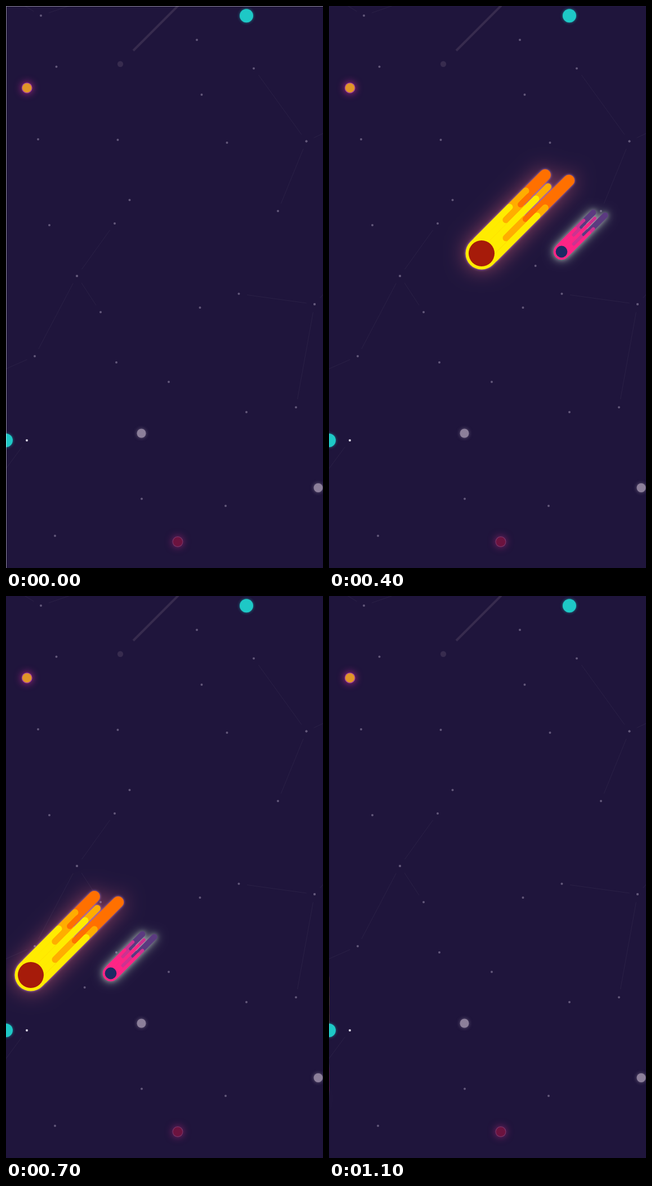
Recreate the animation shown at these times as an HTML page with a canvas. Size 563x995 px, loop 1.2 s.

```html
<!DOCTYPE html>
<html lang="en">
<head>
<meta charset="utf-8">
<title>Comets</title>
<style>
html, body { margin: 0; width: 100%; height: 100%; overflow: hidden; background: #1f153c; }
canvas { display: block; width: 563px; height: 995px; }
</style>
</head>
<body>
<canvas id="stage" width="563" height="995"></canvas>
<script>
const W = 563, H = 995, STEP = 100, COUNT = 12, TAU = Math.PI * 2;
const STAR = '#63587a', DUST = '#372b4e';

// chains of linked stars; some ends lie outside the stage
const CONSTELLATIONS = [
  [[12, -13], [62, 17], [140, -10]],
  [[440, 110.5], [533.5, 239.5], [483, 363]],
  [[533.5, 239.5], [590, 213]],
  [[193, 385], [126, 478], [51, 620], [-40, 660]],
  [[126, 478], [168, 542]],
  [[413.5, 509.5], [548, 528], [515, 710.5]],
  [[548, 528], [585, 486]],
  [[37, 769], [-20, 846]]
];
const LOOSE = [
  [339, 60], [89.5, 107.5], [347.5, 157], [57, 236], [198.5, 237],
  [392.5, 242], [219.5, 343.5], [77, 388], [344.5, 534], [196, 631],
  [289, 665.5], [427, 719], [241, 872.5], [390, 885], [87, 938]
];

// time, x and y of the large comet's head
const PATH = [
  [200, 419, 291], [400, 271, 438], [600, 122.5, 590], [700, 44, 671], [900, -97.5, 814]
];

// where each lane of the flame turns from body to mid colour, and where mid ends
const LANES = [[93, 134], [72.5, 110], [136.5, 167], [50, 98], [116.7, 137]];
const LANE_GAP = 11.4, LANE_R = 5.9;
const TAILS = [[-18.4, 178], [18.4, 201]], TAIL_R = 10.1;

const FIRE = {
  size: 1, coreR: 23,
  body: '#ffec00', mid: '#ffad00', tail: '#ff7000', core: '#a61b0a',
  glow: [['rgba(255,95,90,.55)', 36], ['rgba(200,130,235,.75)', 4]]
};
const PINK = {
  size: 0.5, coreR: 20.8,
  body: '#ff2585', mid: '#cc3390', tail: '#5b3a80', core: '#1c2a64',
  glow: [['rgba(200,228,195,.6)', 19], ['rgba(200,228,195,.5)', 8]]
};

function makeCanvas() {
  const c = document.createElement('canvas');
  c.width = W;
  c.height = H;
  return c;
}

function disc(g, x, y, r, color) {
  g.fillStyle = color;
  g.beginPath();
  g.arc(x, y, r, 0, TAU);
  g.fill();
}

function line(g, x1, y1, x2, y2, width, color) {
  g.lineWidth = width;
  g.strokeStyle = color;
  g.beginPath();
  g.moveTo(x1, y1);
  g.lineTo(x2, y2);
  g.stroke();
}

// joins two stars, leaving a gap around each
function link(g, [x1, y1], [x2, y2]) {
  const gap = 14.5, d = Math.hypot(x2 - x1, y2 - y1);
  const dx = (x2 - x1) / d * gap, dy = (y2 - y1) / d * gap;
  line(g, x1 + dx, y1 + dy, x2 - dx, y2 - dy, 1, 'rgba(255,255,255,.05)');
}

function planet(g, x, y, r, color, glow, blur, rim) {
  g.save();
  g.shadowColor = glow;
  g.shadowBlur = blur;
  disc(g, x, y, r, rim || color);
  g.restore();
  if (rim) disc(g, x, y, r - 1.2, color);
}

function sky(g) {
  g.fillStyle = '#1f153c';
  g.fillRect(0, 0, W, H);
  for (const chain of CONSTELLATIONS) {
    chain.forEach((p, i) => {
      if (i) link(g, chain[i - 1], p);
      disc(g, ...p, 2, STAR);
    });
  }
  for (const p of LOOSE) disc(g, ...p, 2, STAR);
  disc(g, 37, 769, 2, '#d6d1e0');
  line(g, 306, -1, 226, 79, 4, DUST);
  disc(g, 203, 102.8, 5.2, DUST);
  for (const p of [[427, 17.3], [0, 769]]) planet(g, ...p, 12, '#1ec8c6', 'rgba(30,200,198,.6)', 5);
  for (const p of [[240.5, 756.5], [554.5, 853]]) planet(g, ...p, 8, '#8c7f9a', 'rgba(140,127,154,.7)', 6);
  planet(g, 37.2, 145, 9.5, '#e09628', 'rgba(215,45,160,.85)', 14, '#a0449a');
  planet(g, 305, 948.5, 9.5, '#6c133f', 'rgba(190,40,125,.7)', 14, '#783566');
}

// rounded bar along the comet's axis; from and to are its cap centres
function bar(p, from, to, v, r) {
  p.moveTo(from, v + r);
  p.arc(from, v, r, Math.PI / 2, Math.PI * 1.5);
  p.lineTo(to, v - r);
  p.arc(to, v, r, -Math.PI / 2, Math.PI / 2);
  p.closePath();
}

const OUTLINE = new Path2D();
bar(OUTLINE, 0, 20, 0, 28.5);
for (const [v, end] of TAILS) bar(OUTLINE, 10, end, v, TAIL_R);
LANES.forEach(([, end], i) => bar(OUTLINE, 10, end, (i - 2) * LANE_GAP, LANE_R));

function comet(g, x, y, c) {
  const far = 3000;
  const place = dx => {
    g.setTransform(c.size, 0, 0, c.size, x + dx, y);
    g.rotate(-Math.PI / 4);
  };
  const fill = (color, ...b) => {
    const p = new Path2D();
    bar(p, ...b);
    g.fillStyle = color;
    g.fill(p);
  };
  g.save();

  // light only: the casting shape stays outside the stage
  place(-far);
  g.globalCompositeOperation = 'screen';
  g.shadowOffsetX = far;
  g.fillStyle = '#000';
  for (const [color, blur] of c.glow) {
    g.shadowColor = color;
    g.shadowBlur = blur;
    g.fill(OUTLINE);
  }
  g.shadowColor = 'transparent';
  g.globalCompositeOperation = 'source-over';

  place(0);
  for (const [v, end] of TAILS) fill(c.tail, 40, end, v, TAIL_R);
  fill(c.body, 0, 20, 0, 28.5);
  // even lanes are rounded away from the head, odd lanes towards it
  LANES.forEach(([a, b], i) => {
    const v = (i - 2) * LANE_GAP;
    if (i % 2) {
      fill(c.body, 10, a, v, LANE_R);
      fill(c.mid, a, b, v, LANE_R);
      fill(c.tail, b, b + 20, v * 1.07, LANE_R - 0.8);
    } else {
      fill(c.mid, 10, b, v, LANE_R);
      fill(c.body, 10, a, v, LANE_R);
    }
  });
  disc(g, 0, 0, c.coreR, c.core);
  g.restore();
}

function headAt(t) {
  let i = 0;
  while (i < PATH.length - 2 && t > PATH[i + 1][0]) i++;
  const [t0, x0, y0] = PATH[i], [t1, x1, y1] = PATH[i + 1];
  const k = (t - t0) / (t1 - t0);
  return [x0 + (x1 - x0) * k, y0 + (y1 - y0) * k];
}

function scene(g, t) {
  sky(g);
  if (t < STEP) return;
  const [x, y] = headAt(t);
  disc(g, x + 95.7, y + 22, 2, STAR);
  comet(g, x, y, FIRE);
  comet(g, x + 142, y - 3, PINK);
}

// The top and left pixel edges are half covered, so they keep a fading trace.
function buildPoses() {
  const scratch = makeCanvas(), sg = scratch.getContext('2d'), poses = [];
  for (let i = 0; i < COUNT; i++) {
    const c = makeCanvas(), g = c.getContext('2d');
    g.fillStyle = '#fff';
    g.fillRect(0, 0, W, H);
    if (i) g.drawImage(poses[i - 1], 0, 0);
    scene(sg, i * STEP);
    g.globalAlpha = 0.5;
    g.drawImage(scratch, 0, 0);
    g.globalAlpha = 1;
    g.drawImage(scratch, 1, 1, W - 1, H - 1, 1, 1, W - 1, H - 1);
    poses.push(c);
  }
  return poses;
}

const ctx = document.getElementById('stage').getContext('2d');
const poses = buildPoses();
const start = performance.now();

function draw() {
  const t = Math.max(0, performance.now() - start);
  ctx.drawImage(poses[Math.floor(t / STEP) % COUNT], 0, 0);
  requestAnimationFrame(draw);
}
draw();
</script>
</body>
</html>
```
